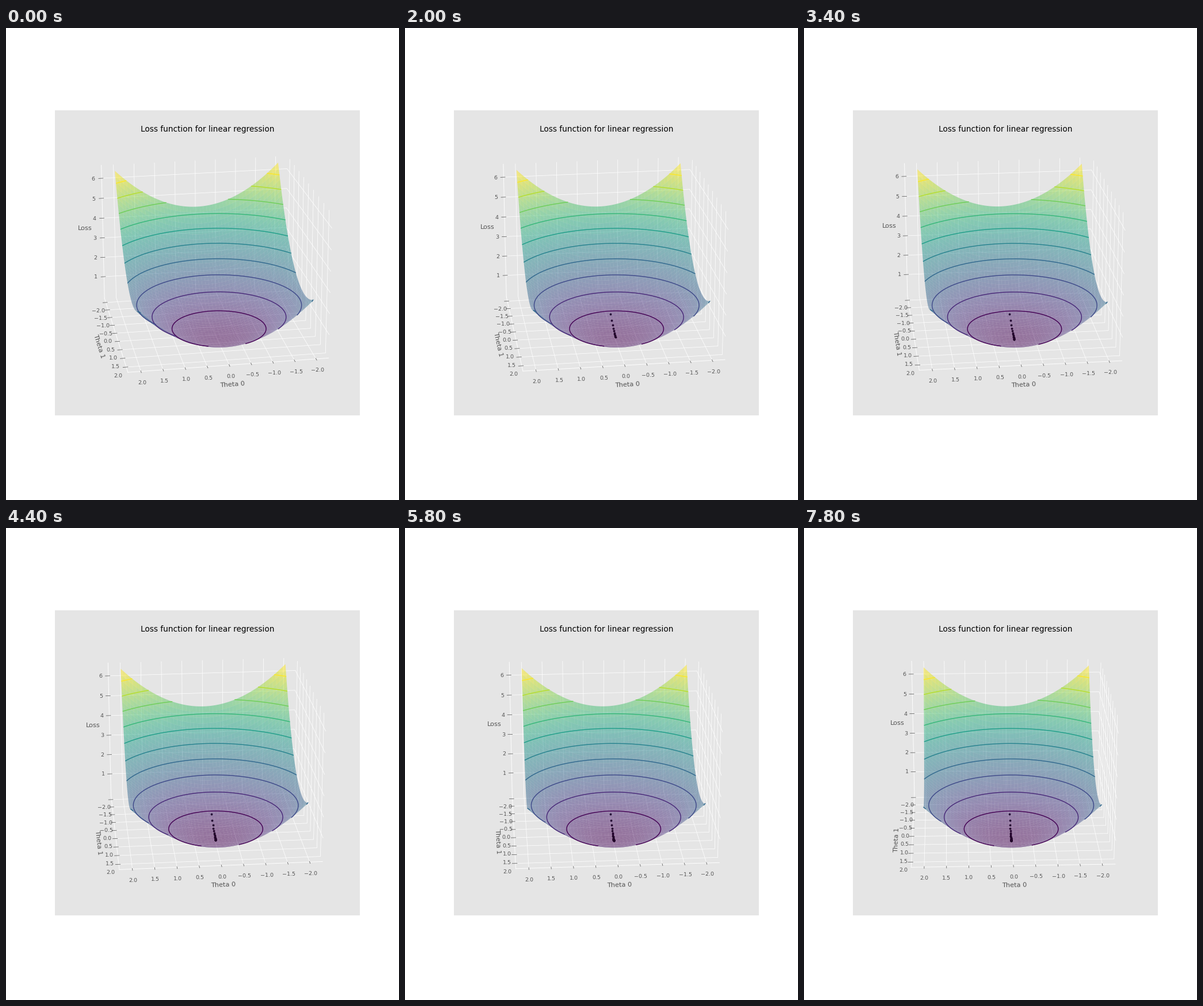
A matplotlib script that plays this animation: 683x820 px, repeating every 8 s.

```python
import numpy as np
import matplotlib.pyplot as plt
from matplotlib.animation import FuncAnimation

W, H, DPI = 683, 820, 68.3
FRAMES, STEP_MS = 40, 200
ELEV, AZIM, TURN = 20, 80, 0.2      # degrees; TURN is per frame
RATE = 0.18                         # share of the remaining error removed per step
GRAY = "#555555"

plt.rcParams.update({
    "font.family": "DejaVu Sans",
    "font.size": 10,
    "axes.facecolor": "#E5E5E5",
    "axes.edgecolor": "white",
    "axes.linewidth": 1,
    "axes.labelcolor": GRAY,
    "axes.labelsize": "large",
    "axes.titlesize": "x-large",
    "grid.color": "white",
    "grid.linestyle": "-",
    "xtick.color": GRAY,
    "ytick.color": GRAY,
})


def loss(t0, t1):
    return 0.5 * (t0 ** 2 + (t1 - 1) ** 2) + 0.01


def padded(lo, hi):
    pad = (hi - lo) / 48
    return lo - pad, hi + pad


fig = plt.figure(figsize=((W + 0.001) / DPI, (H + 0.001) / DPI), dpi=DPI,
                 facecolor="white")
side = 0.775 * W
ax = fig.add_axes([0.125, 147.3 / H, 0.775, side / H], projection="3d",
                  computed_zorder=False)

# Loss surface with its level lines
axis = np.linspace(-2, 2, 100)
T0, T1 = np.meshgrid(axis, axis)
J = loss(T0, T1)
ax.plot_surface(T0, T1, J, cmap="viridis", alpha=0.5, zorder=2)
ax.contour(T0, T1, J, levels=0.6 * np.arange(1, 11), cmap="viridis",
           linewidths=1.5, zorder=3)

# Gradient descent from (0, 0) towards (0, 1)
path1 = 1 - (1 - RATE) ** np.arange(FRAMES)
path0 = np.zeros(FRAMES)
path_loss = loss(path0, path1)
dots, = ax.plot(path0[:1], path1[:1], path_loss[:1], "k.", zorder=1)

ax.set_xlim(*padded(-2.2, 2.2))
ax.set_ylim(*padded(-2.2, 2.2))
ax.set_zlim(*padded(0.01, 6.51))
ax.set_xticks(np.arange(-2, 2.5, 0.5))
ax.set_yticks(np.arange(-2, 2.5, 0.5))
ax.set_zticks(range(1, 7))
for a in (ax.xaxis, ax.yaxis, ax.zaxis):
    a.set_pane_color((1, 1, 1, 0))

ax.set_title("Loss function for linear regression", y=1.0)
ax.set_xlabel("Theta 0")
ax.set_ylabel("Theta 1")
ax.set_zlabel("Loss")


def update(i):
    n = max(i, 1)
    dots.set_data_3d(path0[:n], path1[:n], path_loss[:n])
    dots.set_visible(i > 0)
    ax.view_init(elev=ELEV, azim=AZIM + TURN * i)
    return [dots]


anim = FuncAnimation(fig, update, frames=FRAMES, interval=STEP_MS,
                     init_func=lambda: update(0), repeat=True, blit=False)
plt.show()
```
